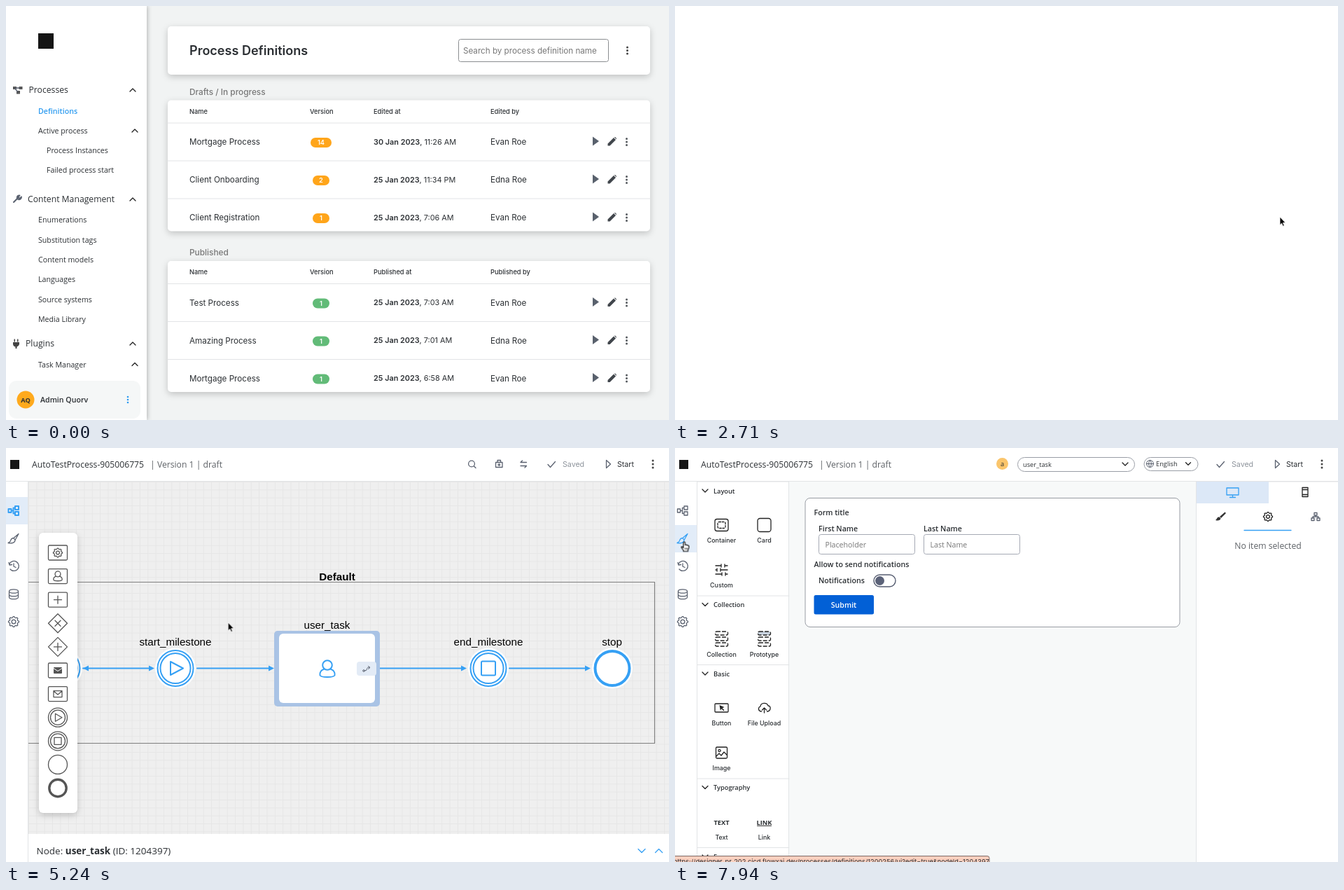
Write an HTML page that moves like this. It is 947 px wide and 591 px high and loops after 8000 ms.

```html
<!DOCTYPE html>
<html lang="en">
<head>
<meta charset="utf-8">
<title>Process designer</title>
<style>
html, body { margin: 0; width: 100%; height: 100%; overflow: hidden; background: #fff; }
svg { display: block; width: 947px; height: 591px; }
text { font-family: "Open Sans", sans-serif; fill: #2b2f33; }
.ui { font-family: Inter, sans-serif; }
.lane { font-family: "Liberation Sans", Arial, sans-serif; font-size: 15.2px; fill: #000; }
.mid { text-anchor: middle; }
.med { font-weight: 500; }
.semi { font-weight: 600; }
.bold { font-weight: 700; }
.tiny { font-size: 8.9px; }
.s9 { font-size: 9.25px; }
.s10 { font-size: 10.65px; }
.s11 { font-size: 11.65px; }
.s12 { font-size: 12.2px; }
.s13 { font-size: 13.5px; }
.head { font-size: 18.05px; }
.date { font-size: 10.85px; }
.group { font-size: 11.85px; }
.grey { fill: #777; }
.soft { fill: #5d6166; }
.pale { fill: #8e949c; }
.white { fill: #fff; }
.link { fill: #2f9cf0; font-weight: 600; }
.line { fill: none; stroke: #5b6270; stroke-width: 1.3; stroke-linejoin: round; stroke-linecap: round; vector-effect: non-scaling-stroke; }
.blue { stroke: #36a0f4; }
.dark { stroke: #222; }
.faint { stroke: #d9dce0; }
.rule { stroke: #e2e4e6; stroke-width: 1; }
.thin { stroke-width: 1; }
.wide { stroke-width: 2; }
.tools .line { stroke: #555; }
.card { fill: #fff; filter: drop-shadow(0 3px 5px #0003); }

/* One loop is 8 s, so 1% is 80 ms. */
.a { opacity: 0; animation: 8s step-end infinite; }
.fade { animation-timing-function: linear; }
#list { animation-name: list; }
#editor { animation-name: editor; }
#tip { animation-name: tip; }
#dot1 { animation-name: dot1; }
#dot2 { animation-name: dot2; }
#dot3 { animation-name: dot3; }
#chrome { animation-name: chrome; }
#logo, #flow { animation-name: flow; }
#title { animation: title 8s ease-in-out infinite; }
#plain { animation-name: plain; }
#picked { animation-name: picked; }
#off, #hint { animation-name: hint; }
#info { animation-name: info; }
#on { animation-name: on; }
#uitip { animation-name: uitip; }
.flowonly { animation-name: flowonly; }
.designer { animation-name: designer; }
#avatar { animation-name: avatar; }
#short { animation-name: short; }
#long { animation-name: long; }
#arrow { animation-name: arrow; }
#hand { animation-name: hand; }
#cursor { animation: move 8s ease-in-out infinite; }

@keyframes list { 0% { opacity: 1 } 32.25%, 100% { opacity: 0 } }
@keyframes editor { 0% { opacity: 0 } 32.25%, 100% { opacity: 1 } }
@keyframes tip { 0%, 25.7% { opacity: 0 } 27.5%, 100% { opacity: 1 } }
@keyframes dot1 { 0% { opacity: 0 } 28.2% { opacity: .95 } 31.5%, 100% { opacity: 0 } }
@keyframes chrome { 0%, 35.5% { opacity: 0 } 38%, 100% { opacity: 1 } }
@keyframes flow { 0%, 44% { opacity: 0 } 45.6%, 100% { opacity: 1 } }
@keyframes title { 0%, 44% { transform: translateX(-12px) } 45.6%, 100% { transform: none } }
@keyframes dot2 { 0% { opacity: 0 } 58.6% { opacity: .95 } 61%, 100% { opacity: 0 } }
@keyframes plain { 0% { opacity: 1 } 60.25%, 100% { opacity: 0 } }
@keyframes picked { 0% { opacity: 0 } 60.25%, 100% { opacity: 1 } }
@keyframes hint { 0% { opacity: 1 } 62.5%, 100% { opacity: 0 } }
@keyframes info { 0% { opacity: 0 } 62.5%, 100% { opacity: 1 } }
@keyframes on { 0% { opacity: 0 } 62.5% { opacity: 1 } 89.75%, 100% { opacity: 0 } }
@keyframes uitip { 0%, 71.9% { opacity: 0 } 73.5%, 84.5% { opacity: 1 } 86%, 100% { opacity: 0 } }
@keyframes dot3 { 0% { opacity: 0 } 84.6% { opacity: .95 } 88.5%, 100% { opacity: 0 } }
@keyframes short { 0% { opacity: 0 } 75.75% { opacity: 1 } 94.1%, 100% { opacity: 0 } }
@keyframes long { 0% { opacity: 0 } 94.1%, 100% { opacity: 1 } }
@keyframes flowonly { 0% { opacity: 1 } 89.75%, 100% { opacity: 0 } }
@keyframes designer { 0% { opacity: 0 } 89.75%, 100% { opacity: 1 } }
@keyframes avatar { 0%, 97% { opacity: 0 } 99.2%, 100% { opacity: 1 } }
@keyframes arrow { 0% { opacity: 0 } 12.5% { opacity: 1 } 23% { opacity: 0 } 32.25% { opacity: 1 } 71%, 100% { opacity: 0 } }
@keyframes hand { 0% { opacity: 0 } 23% { opacity: 1 } 32.25% { opacity: 0 } 71%, 100% { opacity: 1 } }
@keyframes move {
  0%, 12.5% { transform: translate(557px, 458px) }
  20.5% { transform: translate(850px, 294px) }
  22% { transform: translate(855px, 302px) }
  23.5%, 32.25% { transform: translate(864px, 302px) }
  43% { transform: translate(863px, 281px) }
  46.4%, 51.4% { transform: translate(865px, 279px) }
  57.2% { transform: translate(465px, 300px) }
  58.5%, 61.7% { transform: translate(461px, 304px) }
  71.4%, 79.3% { transform: translate(13px, 133px) }
  79.4%, 100% { transform: translate(13.5px, 133.5px) }
}
</style>
</head>
<body>
<svg id="stage" viewBox="0 0 947 591"></svg>
<script>
const text = (x, y, s, cls) => `<text x="${x}" y="${y}" class="${cls}">${s}</text>`;
const path = (d, cls = '') => `<path d="${d}" class="line ${cls}"/>`;
const solid = (d, fill) => `<path d="${d}" fill="${fill}"/>`;
const rect = (x, y, w, h, extra = '') => `<rect x="${x}" y="${y}" width="${w}" height="${h}" ${extra}/>`;
const circle = (x, y, r, extra = '') => `<circle cx="${x}" cy="${y}" r="${r}" ${extra}/>`;
const at = (x, y, s) => `<g transform="translate(${x} ${y})">${s}</g>`;
const layer = (id, s, cls = '') => `<g id="${id}" class="a ${cls}">${s}</g>`;
const part = (cls, s) => `<g class="a ${cls}">${s}</g>`;
const each = (items, fn) => items.map(fn).join('');
const dots = (x, y, gap, r, fill) => each([-gap, 0, gap], d => circle(x, y + d, r, `fill="${fill}"`));
const chevron = (x, y, w, dir, cls) => path(`M${x - w} ${y - dir * w / 2}l${w} ${dir * w} ${w} ${-dir * w}`, cls);

const gear = (r, cls = '') => {
  const pts = Array.from({ length: 32 }, (_, i) => {
    const a = (i - .5) / 32 * 2 * Math.PI, q = i % 4 < 2 ? r : r * .8;
    return [q * Math.cos(a), q * Math.sin(a)].map(v => v.toFixed(2));
  });
  return `<polygon points="${pts.join(' ')}" class="line ${cls}"/>` + circle(0, 0, r * .38, `class="line ${cls}"`);
};
const person = (k, cls) => `<g transform="scale(${k})">` +
  circle(0, -5.5, 6.8, `class="line ${cls}"`) +
  path('M-4.500 0C-10 2-11 6-10.500 9Q-9.500 11.500 0 11.500T10.500 9C11 6 10 2 4.500 0', cls) + '</g>';
const brush = cls => path('M7-7L0-1 2 2ZM0-1C-4-1-4 2-5 4L-8 6C-3 7 2 6 2 2', cls);
const tree = cls => path('M-7.5-2.5h4v5h-4zM2-6.5h5v5h-5zM2 1.5h5v5h-5zM-3.5 0h3M2-4h-2.5v8H2', cls);

/* Process list */
const play = solid('M-4-6.5L5 0-4 6.5Z', '#59616d');
const pencil = solid('M-6 6v-3L2.5-5.5 5.5-2.5-3 6ZM3.3-6.2L4.6-6.5 6.5-4.6 6.2-3.3Z', '#41464c');

const table = (top, title, verb, color, rows) =>
  text(262, top - 8, title, 'ui med group grey') +
  rect(231, top, 689, 187, 'rx="5" class="card"') +
  each([[262, 'Name'], [434, 'Version'], [525, verb + ' at'], [692, verb + ' by']],
    ([x, s]) => text(x, top + 19, s, 'ui med s9')) +
  each(rows, ([name, ver, day, time, by], i) => {
    const y = top + 59.5 + i * 54, w = ver > 9 ? 30 : 24;
    return path(`M231 ${y - 27}h689`, 'rule') +
      text(262, y + 4, name, 'ui s11') +
      rect(450 - w / 2, y - 6, w, 14, `rx="7" fill="${color}"`) +
      text(450, y + 4.3, ver, 'ui mid semi s9 white') +
      text(525, y + 3.6, `<tspan class="semi">${day} Jan 2023</tspan>, ${time}`, 'ui date') +
      text(692, y + 4, by, 'ui s11') +
      at(842, y - 1, play) + at(865.5, y - .5, pencil) + dots(886.5, y, 4.5, 1.5, '#55595e');
  });

const sections = [[32.5, 124, 'Processes'], [31, 280, 'Content Management'], [28, 486, 'Plugins']];
const links = [
  [46, 153.5, 'Definitions', 'link'], [46, 182, 'Active process'], [58, 210, 'Process Instances'],
  [58, 238, 'Failed process start'], [46, 309, 'Enumerations'], [46, 337.5, 'Substitution tags'],
  [46, 366, 'Content models'], [46, 394, 'Languages'], [46, 422.5, 'Source systems'],
  [46, 451, 'Media Library'], [46, 515.5, 'Task Manager']
];
const sidebar =
  rect(0, 0, 201, 591, 'fill="#fff" style="filter:drop-shadow(1px 0 3px #0004)"') +
  rect(46, 39, 22, 22, 'fill="#151515"') +
  each(sections, ([x, y, s]) => text(x, y, s, 's12') + chevron(181, y - 4, 4, -1, 'dark')) +
  each(links, ([x, y, s, cls = '']) => text(x, y, s, 's10 ' + cls)) +
  each([178, 511.5], y => chevron(184, y, 4, -1, 'dark')) +
  solid('M10 115h5v4h-5zM18.5 115h5v4h-5zM15 121h5v4.5h-5z', '#555') + path('M13 117h7M13 118l4 5') +
  path('M11 280L17 274M22 272.5L19.5 275 17.5 273 19.5 270.5C16 270 15 273 16.5 275.5 19 277 22 276 22 272.5', 'wide') +
  solid('M10 480h9v3q-1 3-3.5 3.5V489h-2v-2.5Q10.5 486 10 483ZM11.5 475.5h1.5v4h-1.5zM16 475.5h1.5v4H16z', '#444') +
  rect(4, 535, 188, 54, 'rx="11" fill="#f5f7f7"') +
  circle(28, 562, 12.5, 'fill="#ffaa1d"') + text(28, 565.5, 'AQ', 'mid bold s9') +
  text(49, 565.8, 'Admin Quorv', 'semi s10') + dots(174, 562, 4, 1.3, '#2f9cf0');

const evan = 'Evan Roe', edna = 'Edna Roe';
const list = rect(0, 0, 947, 591, 'fill="#f1f3f3"') + sidebar +
  rect(231, 29, 689, 69, 'rx="5" class="card"') +
  text(262, 70, 'Process Definitions', 'ui semi head') +
  rect(646.5, 47.5, 214, 32, 'rx="3" fill="#fff" stroke="#8a8d90"') +
  text(653, 68, 'Search by process definition name', 'ui s11 grey') + dots(887.5, 63.5, 4.5, 1.5, '#444') +
  table(134.5, 'Drafts / In progress', 'Edited', '#ffa51a', [
    ['Mortgage Process', 14, 30, '11:26 AM', evan],
    ['Client Onboarding', 2, 25, '11:34 PM', edna],
    ['Client Registration', 1, 25, '7:06 AM', evan]]) +
  table(364, 'Published', 'Published', '#62bb78', [
    ['Test Process', 1, 25, '7:03 AM', evan],
    ['Amazing Process', 1, 25, '7:01 AM', edna],
    ['Mortgage Process', 1, 25, '6:58 AM', evan]]) +
  layer('tip', rect(825, 320, 81, 30, 'rx="2" fill="#a1a4a6" style="filter:drop-shadow(0 1px 2px #0004)"') +
    text(865, 339, 'Edit process', 'ui mid s11 white'), 'fade');

/* Flow canvas */
const edge = (x1, x2, both) => path(`M${x1} 314.5H${x2 - 4}`, 'blue wide') +
  solid(`M${x2} 314.5l-8-4v8z${both ? `M${x1} 314.5l8-4v8z` : ''}`, '#36a0f4');
const hoop = r => circle(0, 0, r, 'class="line blue wide"');
const ring = (x, s) => at(x, 314.5, circle(0, 0, 29, 'fill="#fff"') + hoop(25.5) + hoop(21.5) + s);
const label = (x, y, s, cls = '') => text(x, y, s, 'lane mid ' + cls);
const box = rect(-13.5, -10.5, 27, 21, 'rx="1.5" class="line"');
const diamond = path('M0-13.5L13.5 0 0 13.5-13.5 0Z');
const plus = path('M-5.5 0h11M0-5.5v11');
const disc = circle(0, 0, 13.5, 'class="line"');
const double = disc + circle(0, 0, 10.5, 'class="line"');
const palette = [
  box + gear(6.5), box + person(.58, ''), box + plus,
  diamond + path('M-4-4l8 8M4-4l-8 8'), diamond + plus,
  box + rect(-6, -4.5, 12, 9, 'rx="1" fill="#555"') + '<path d="M-6-3L0 1 6-3" fill="none" stroke="#fff"/>',
  box + path('M-6-4.5H6v9H-6ZM-6-4L0 1 6-4'),
  double + path('M-3.5-5.5L6 0-3.5 5.5Z'), double + rect(-5, -5, 10, 10, 'class="line"'),
  disc, circle(0, 0, 12.2, 'class="line" style="stroke-width:3.4"')
];
const user = at(459, 315.5, person(1, 'blue wide'));

const flow = rect(32, 48, 915, 503, 'fill="#efefef"') + rect(32, 48, 915, 503, 'fill="url(#grid)"') +
  '<path d="M31 191.5H926.5V421.5H31" fill="none" stroke="#808080" stroke-width="1.2"/>' + label(473, 189, 'Default', 'bold') +
  ring(80, '') + edge(110, 212, true) +
  ring(242, path('M-7-9.5L11 0-7 9.5Z', 'blue wide')) + label(242, 281.5, 'start_milestone') +
  ring(689, rect(-10, -10, 20, 20, 'rx="1.5" class="line blue wide"')) + label(689, 281.5, 'end_milestone') +
  at(866, 314.5, circle(0, 0, 29, 'fill="#fff"') + circle(0, 0, 24.5, 'class="line blue" style="stroke-width:4;fill:#fff"')) +
  label(865.5, 281.5, 'stop') + edge(719, 835) +
  layer('plain', edge(273, 392) + edge(525, 658) + rect(392, 270, 133, 89, 'fill="#fff"') + user + label(458.5, 267, 'user_task')) +
  layer('picked', edge(273, 383) + edge(534, 658) +
    rect(383, 261, 151, 108, 'rx="5" fill="#a9c3e5"') + rect(390, 265, 137, 99, 'rx="6" fill="#fff"') + user +
    rect(501, 305, 28, 20, 'rx="4" fill="#e3ebf6"') +
    circle(511, 318, 1.3, 'class="line thin"') + path('M512.5 318q3 0 3-2.500t4-2.500M517.5 311.5l2.500 2-2.500 2', 'thin') +
    label(458.5, 257.5, 'user_task')) +
  rect(47, 121, 55, 400, 'rx="6" class="card"') +
  `<g class="tools">${each(palette, (s, i) => at(74, 149.5 + i * 33.6, s))}</g>`;

/* Form designer */
const item = (x, y, name, icon) => at(x, y, icon) + text(x, y + 25, name, 'ui mid med tiny');
const stack = fill => each([-8, 0, 8], y =>
  rect(-9, y - 2.5, 18, 5, `rx="2" class="line dark" stroke-dasharray="5 3" style="fill:${y < 0 ? fill : 'none'}"`));
const field = (x, name, hint) => text(x, 119, name, 'semi s10') +
  rect(x + .5, 123.5, 137, 28, 'rx="3" fill="#fff" stroke="#a5a9b4"') + text(x + 9.5, 141.5, hint, 's10 grey');
const word = s => text(0, 4, s, 'mid bold s9');
const designer = rect(163, 48, 581, 543, 'fill="#f7f9f9"') +
  rect(31.5, 48, 131, 545, 'fill="#fff" stroke="#e2e4e6"') +
  each([[61, 'Layout'], [223.5, 'Collection'], [322, 'Basic'], [484.5, 'Typography'], [583, 'Forms']], ([y, s]) =>
    (y > 61 ? path(`M32 ${y - 12.5}h131`, 'rule') : '') +
    chevron(43, y, 4, 1, 'dark') + text(55, y + 3.5, s, 'semi s9')) +
  item(66.5, 110, 'Container', rect(-9.5, -8.5, 19, 17, 'rx="3" class="line dark"') + rect(-5.5, -4.5, 11, 9, 'rx="2" class="line dark" stroke-dasharray="2.5 1.8"')) +
  item(127.5, 110, 'Card', rect(-9.5, -9.5, 19, 19, 'rx="3.5" class="line dark"')) +
  item(66.5, 174, 'Custom', path('M-8.5-6h8M4.5-6h4M-8.5 0h2M-1.5 0h10M-8.5 6h9M5.5 6h3M-.5-8v4M4.5-8v4M-6.5-2v4M-1.5-2v4M.5 4v4M5.5 4v4', 'dark')) +
  item(66.5, 272.5, 'Collection', stack('none')) + item(127.5, 272.5, 'Prototype', stack('#c9d3df')) +
  item(66.5, 371, 'Button', rect(-9.5, -6, 19, 12, 'rx="1" class="line dark"') + solid('M-3-4l7 3-3 1.2 3 3-1.2 1-3-3-1.5 2.5z', '#222')) +
  item(127.5, 371, 'File Upload', path('M-4 5H-5C-9 4-9-1-5.5-2-5-8 4-8 5.5-3 10-3 9.5 4 5 5H4M0 7V0M-3 3L0 0 3 3', 'dark')) +
  item(66.5, 435, 'Image', rect(-8, -8, 16, 16, 'rx="1.5" class="line dark"') + circle(-3, -3, 1.6, 'class="line dark"') + path('M-7.5 5l4-4 3 3 4-5 4 4', 'dark')) +
  item(66.5, 533.5, 'Text', word('TEXT')) + item(127.5, 533.5, 'Link', word('LINK') + path('M-10 5.8h20', 'dark thin')) +
  rect(186, 71.5, 535, 184, 'rx="7" fill="#fff" stroke="#989ca3"') +
  text(198.5, 96, 'Form title', 'semi s10') + field(205, 'First Name', 'Placeholder') + field(355, 'Last Name', 'Last Name') +
  text(198.5, 169.5, 'Allow to send notifications', 'semi s10') + text(205, 193, 'Notifications', 'semi s10') +
  rect(284, 181, 31, 17, 'rx="8.5" fill="#fff" stroke="#555c70" stroke-width="1.4"') + circle(292.5, 189.5, 6.5, 'fill="#5b6278"') +
  rect(198.5, 210, 85.5, 27.5, 'rx="2.5" fill="#0260d6"') + text(241, 227.5, 'Submit', 'mid semi s10 white') +
  rect(744.5, 48, 203, 545, 'fill="#fff" stroke="#e2e4e6"') + rect(745, 48, 103, 31, 'fill="#dce8f7"') +
  path('M788 57h17v10h-17zM796.5 67v3M792.5 70.5h8', 'blue') + path('M896 56.5h8v13h-8zM896 59.5h8M896 66.5h8', 'dark') +
  at(779, 98, solid('M6.5-6.5L8-5 1 2-1 0ZM-1.5 .5L.5 2.5C0 5-3 6.5-7 5-5 4-5 0-1.5 .5Z', '#333')) +
  at(847, 98, gear(6.5, 'dark')) +
  at(915, 98, path('M-2-5.5h4v3.5h-4zM-6 2h4v3.5h-4zM2 2h4v3.5H2zM0-2v2M-4 2V0h8v2')) +
  path('M813 117.5h67', 'blue') + text(847, 143.5, 'No item selected', 'mid s12 soft');

/* Shared header and rail */
const flowTools = path('M668.5 26l2.5 2.5') + circle(665, 22.5, 4.4, 'class="line"') +
  path('M699.5 20.5h9.5v7h-9.5zM702 20v-2.5h4.5v2.5M704.3 22.5v3M702.8 24h3') +
  path('M743.5 20.5h-8.5l2.5-2.5M735 25.5h8.5l-2.5 2.5');
const formTools = rect(489.5, 13.5, 167, 20, 'rx="10" fill="#fff" stroke="#999da5"') +
  text(497, 26.5, 'user_task', 's9') + chevron(643, 23, 4, 1, 'dark') +
  rect(670, 13.5, 77, 19, 'rx="9.5" fill="#fff" stroke="#999da5"') +
  circle(678.5, 22.5, 5, 'class="line thin"') + path('M673.5 22.5h10M678.5 17.5q-4 5 0 10 4-5 0-10', 'thin') +
  text(687, 25.5, 'English', 's9') + chevron(733, 22.5, 3.5, 1, 'dark');
const header = path('M0 47.5h947M31.5 48v543', 'rule') +
  `<g id="title">${text(37, 27.5, 'AutoTestProcess-905006775', 's12')}${text(206, 27.5, '| Version 1 | draft', 's12 soft')}</g>` +
  path('M774 23.5l3.5 4 7-8') + text(795, 26.8, 'Saved', 'ui s10 pale') +
  path('M857.5 17.5l6 5.5-6 5.5z') + text(873, 26.8, 'Start', 'ui s10') + dots(924, 23, 5, 1.5, '#444');
const active = y => rect(0, y, 31, 39, 'fill="#e2ecf8"');
const rail = part('flowonly', active(70) + at(11, 89.5, tree('blue wide'))) +
  part('designer', active(110) + at(11, 89.5, tree('')) + at(11, 129.5, brush('blue'))) +
  layer('off', at(11, 129.5, brush('faint'))) + layer('on', at(11, 129.5, brush(''))) +
  at(11, 168.5, path('M-6-3A7 7 0 1 1-5 4.5M-7-5l1 3.5 3.5-.5M0-3.5V.5L3 2')) +
  at(11, 208.5, path('M-6.5-4a6.5 2.7 0 0 1 13 0 6.5 2.7 0 0 1-13 0v8.5c0 3.6 13 3.6 13 0V-4M-6.5 .5c0 3.6 13 3.6 13 0')) +
  at(11, 248, gear(7.5));
const status = (w, x, s) =>
  `<path d="M-2 582.5H${w - 3}q3 0 3 3V593H-2Z" fill="#fbd0bf" stroke="#7d6a66"/>` + text(x, 593.5, s, 'ui s9');
const address = 'designer-pr-202.cicd.flowxai.dev/processes/definitions/1200256/ui?e';

const editor = rect(0, 0, 947, 591, 'fill="#fff"') +
  layer('flow', flow, 'fade') +
  layer('chrome', header + rail +
    layer('hint', text(43.5, 580.3, 'Click any node to select', 's13 soft')) +
    layer('info', text(43.5, 580.3, 'Node: <tspan class="bold">user_task</tspan> (ID: 1204397)', 's13') +
      chevron(908, 575, 5, 1, 'blue') + chevron(932.5, 575, 5, -1, 'blue')) +
    part('flowonly', flowTools), 'fade') +
  layer('logo', rect(6, 17, 13, 13, 'fill="#151515"'), 'fade') +
  part('designer', designer + formTools) +
  layer('avatar', circle(467.5, 22.5, 8.5, 'fill="#fac56c"') + text(467.5, 25.8, 'a', 'mid s9'), 'fade') +
  layer('uitip', solid('M29 129l6-4v8z', '#55585c') + rect(33.5, 114, 77, 31, 'rx="3" fill="#55585c"') +
    text(72, 133.3, 'UI Designer', 'ui mid s11 white'), 'fade') +
  layer('short', status(312, 0, address)) +
  layer('long', status(449, -2, `https://${address}dit=true&amp;nodeId=1204397`));

const click = (id, x, y) => layer(id, circle(x, y, 10, 'fill="#f9302f"'));
const cursor =
  layer('arrow', '<path d="M0 0V11.5L2.6 9.2 4.4 13.3 6.3 12.5 4.5 8.5H8Z" fill="#000" stroke="#fff" stroke-width=".8"/>') +
  layer('hand', '<path d="M-1.5 1.5Q0-.5 1 1.5V5Q2.5 4 3.2 5.3 4.7 4.5 5.2 6 6.5 5.5 6.5 7.5 6.5 10 5 12V14H-1.5V12.5L-4.5 8.5Q-4.5 6.5-2.5 8L-1.5 9Z" fill="#fff" stroke="#000" stroke-width="1.1" stroke-linejoin="round"/>' +
    '<path d="M.8 9v2.5M2.6 9v2.5M4.2 9v2.5" stroke="#000" stroke-width=".7"/>');

document.getElementById('stage').innerHTML = `
  <defs><pattern id="grid" x="32" y="48" width="11.35" height="11.35" patternUnits="userSpaceOnUse">
    <path d="M.5 0V11.35M0 .5H11.35" stroke="#e6e6e6"/></pattern></defs>` +
  layer('list', list) + layer('editor', editor) +
  click('dot1', 863, 303) + click('dot2', 461, 305) + click('dot3', 14, 133) +
  `<g id="cursor">${cursor}</g>`;
</script>
</body>
</html>
```
